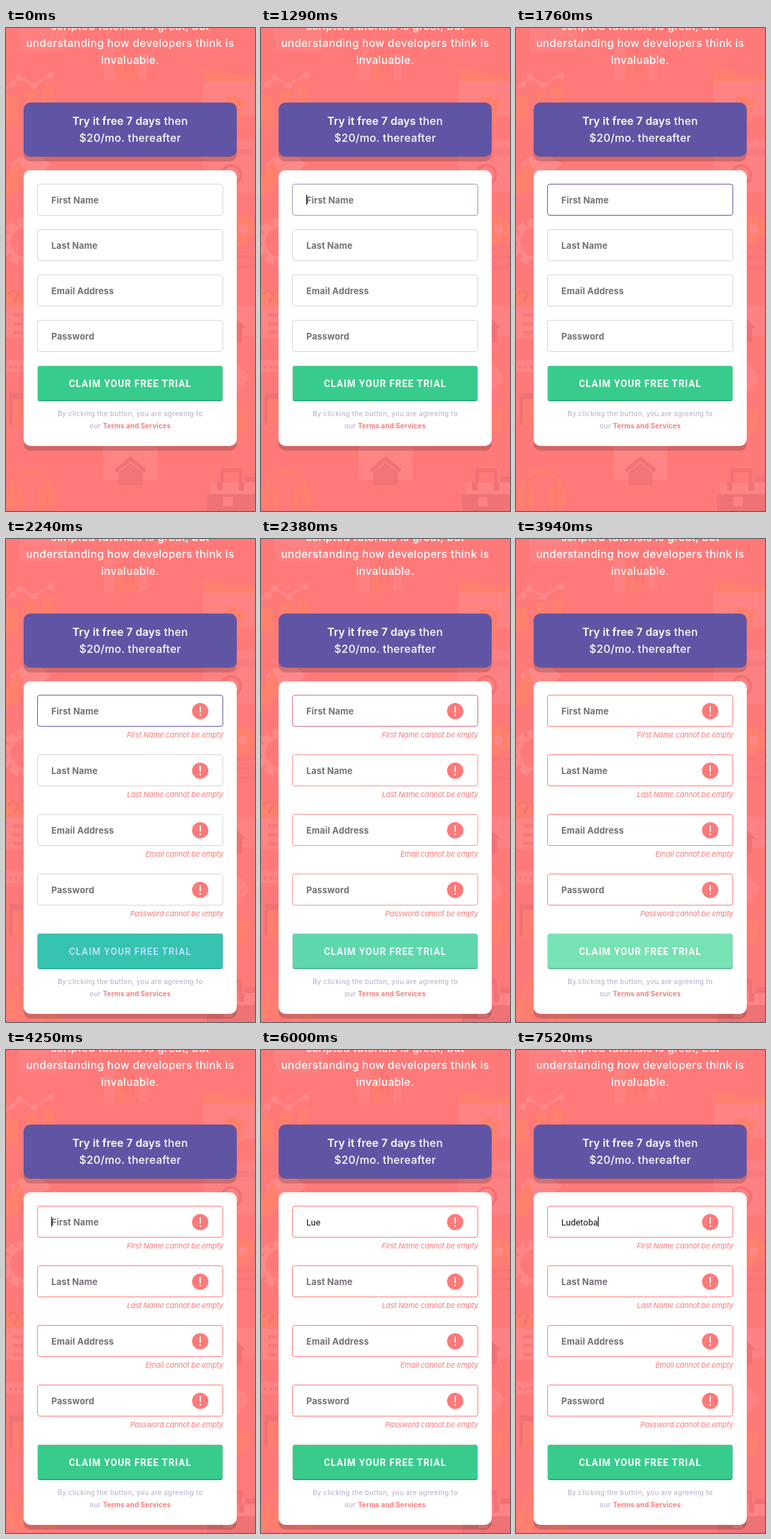
These frames come from a looping animation (368x713 px, 8 s). An HTML page:

```html
<!DOCTYPE html>
<html lang="en">
<head>
<meta charset="utf-8">
<title>Sign-up form</title>
<style>
* { box-sizing: border-box; margin: 0; }
html, body { width: 100%; height: 100%; overflow: hidden; }
body { position: relative; background: #ff7979; font: 500 16px/25px Inter, "Open Sans", sans-serif; letter-spacing: .32px; }
body > * { position: absolute; }
#art { left: 0; top: 0; }
.pink { fill: #ff8888; } .orange { fill: #ff806d; } .dusk { fill: #ef7275; }
.ring { fill: none; stroke: #ff8888; }
.ring.orange { stroke: #ff806d; } .ring.dusk { stroke: #ef7275; }
.intro { left: 0; top: -15px; width: 367px; text-align: center; color: #fff; }
.offer, .card { left: 26px; width: 315px; border-radius: 10px; box-shadow: 0 7px rgba(0, 0, 0, .17); }
.offer { top: 110px; height: 80px; padding-top: 15px; background: #6055a5; color: #fff; text-align: center; }
.offer b { font-weight: 600; letter-spacing: .1px; }
.card { top: 210px; padding: 20px 20px 21px; background: #fff; }
.row { margin-bottom: 20px; }
.field { position: relative; height: 47px; padding-left: 20px; border: 1px solid; border-radius: 4px; line-height: 45px; white-space: pre; }
.hint { font-size: 13px; font-weight: 700; letter-spacing: .15px; color: #757077; }
#typed { font: 13px/45px Roboto, sans-serif; letter-spacing: 0; color: #111; }
#caret { position: absolute; top: 15px; width: 1px; height: 15px; background: #000; }
.icon { position: absolute; left: 228px; top: 11px; }
.msg { height: 21px; font-size: 11px; font-weight: 400; font-style: italic; letter-spacing: -.22px; text-align: right; color: #ff7979; }
.icon, .msg { display: none; }
.bad .icon, .bad .msg { display: block; }
#button { position: relative; height: 53px; border: 1px solid #dedede; border-bottom: 0; border-radius: 4px; box-shadow: inset 0 -2px rgba(0, 0, 0, .16); color: #fff; font: bold 14px/52px Roboto, sans-serif; letter-spacing: 1px; text-align: center; }
#tap { position: absolute; inset: -1px -1px 0; border-radius: 4px; background: rgba(51, 181, 229, .4); }
.terms { margin-top: 9px; font-size: 10px; line-height: 18px; letter-spacing: .31px; text-align: center; color: #bab7d4; }
.terms b { font-weight: 700; letter-spacing: .2px; color: #ff7979; }
</style>
</head>
<body>
<svg id="art" width="368" height="713">
  <!-- charts and hand -->
  <path class="pink" d="M20 0h70v34h-70z" opacity=".5"/>
  <path class="ring" stroke-width="3" d="M0 90L10 83L20 72L40 85L66 69"/>
  <g class="pink"><circle cx="10" cy="83" r="5"/><circle cx="20" cy="73" r="5"/><circle cx="41" cy="85" r="5"/><circle cx="66" cy="70" r="5"/></g>
  <path class="orange" d="M0 101h18v36h-18zM28 94h17v20h-17zM54 88h15v25h-15zM0 140h26v3h-26z"/>
  <path class="pink" d="M145 30h16v48h-16zM196 38h12v38h-12zM222 22l4 4l-14 12z" opacity=".5"/>
  <path class="orange" d="M160 38h34v34q-17 14-34 0z" opacity=".5"/>
  <path class="dusk" d="M174 25h8v40h-8zM184 34h7v32h-7z" opacity=".3"/>
  <!-- folder, gear and camera -->
  <path class="pink" d="M292 78h76v52h-76z" opacity=".7"/>
  <path class="orange" d="M292 63h28l6 6h42v10h-76zM328 100h14v7l9-4l5 9l-7 5v18l-8 10h-20v-34z"/>
  <path class="pink" d="M292 164h76v79h-76z" opacity=".6"/>
  <path class="dusk" d="M325 178h43v10h-43z" opacity=".4"/>
  <circle class="ring dusk" cx="333" cy="217" r="14" stroke-width="4"/>
  <!-- rocket and cog -->
  <path class="pink" d="M20 190h32l16 11l-20 16h-30l-12-15z"/>
  <path class="orange" d="M0 222l18-28l8 18v12l-10 20l-16 3z"/>
  <circle class="ring" cx="28" cy="316" r="29" stroke-width="12" stroke-dasharray="13 5"/>
  <circle class="ring" cx="28" cy="316" r="24" stroke-width="5"/>
  <!-- pin and text lines -->
  <path class="orange" d="M341 280q27-10 27 19q-5 16-27 22z"/>
  <circle class="pink" cx="351" cy="297" r="7"/>
  <path class="dusk" d="M341 323h27v4h-27zM341 336h27v4h-27zM341 351h27v4h-27z" opacity=".5"/>
  <!-- lock and page -->
  <path class="orange" d="M0 386h18l6 8v16h-24z"/>
  <path class="ring dusk" stroke-width="4" d="M4 394q2-8 10-5t-1 12v5" opacity=".7"/>
  <path class="pink" d="M0 411h26v47h-26zM0 490h26v18h-26z" opacity=".75"/>
  <path class="dusk" d="M10 421h15v5h-15zM10 434h15v5h-15zM10 447h15v5h-15zM4 498h5v5h-5zM12 498h5v5h-5zM20 498h5v5h-5z" opacity=".6"/>
  <!-- house, tag and stand -->
  <path class="pink" d="M341 410h27v45h-27zM341 494l21 22l-21 24z" opacity=".65"/>
  <path class="dusk" d="M341 430l14 13h-6v21h-8zM5 539h21v9h-16v31h16v7h-21z"/>
  <path class="orange" d="M10 550h16v40h-16zM341 562h20v24q-8 14-20 14z" opacity=".8"/>
  <!-- upload box, headset and case -->
  <path class="pink" d="M144 610h80v57h-80z" opacity=".75"/>
  <path class="dusk" d="M184 632l24 20l-4 4l-20-16l-20 16l-4-4z" opacity=".9"/>
  <path class="dusk" d="M184 642l18 14v19h-36v-19z" opacity=".8"/>
  <path class="ring orange" stroke-width="6" d="M9 690v-8a28 28 0 0 1 56 0v8"/>
  <path class="orange" d="M1 680h12v28h-12zM17 677h9v33h-9zM49 677h9v33h-9zM62 680h12v28h-12z"/>
  <path class="dusk" d="M297 688h71v25h-71zM317 650h32v20h-5v-14h-22v14h-5zM354 662h14v8h-14z"/>
  <path class="pink" d="M302 671h66v17h-66zM321 692h14v14h-14z" opacity=".8"/>
  <path class="dusk" d="M312 671h8v12h-8zM344 671h8v12h-8z"/>
</svg>
<p class="intro">scripted tutorials is great, but<br>understanding how developers think is<br>invaluable.</p>
<div class="offer"><b>Try it free 7 days</b> then<br>$20/mo. thereafter</div>
<div class="card" id="card">
  <div id="rows"></div>
  <div id="button">CLAIM YOUR FREE TRIAL<div id="tap"></div></div>
  <p class="terms">By clicking the button, you are agreeing to<br>our <b>Terms and Services</b></p>
</div>
<script>
const LOOP = 8000, FADE = 340, SUBMIT = 2240;
const GREY = [214, 214, 214], PURPLE = [96, 85, 165], RED = [255, 121, 121];
const GREEN = [56, 204, 140], MINT = [119, 226, 179];
const NAME = 'Ludetoba';
// [time, text in the first field]
const typing = [[0, ''], [5070, 'L'], [5250, 'Lu'], [5520, 'Lue'], [6450, 'Lu'],
  ...[6690, 7040, 7220, 7320, 7420, 7520].map((t, i) => [t, NAME.slice(0, i + 3)])];
const caretOn = [[1280, 1760], [4000, 4480], [4960, 6000], [6500, LOOP]];

const $ = id => document.getElementById(id);
$('rows').innerHTML = ['First Name', 'Last Name', 'Email Address', 'Password'].map((label, i) => `
  <div class="row"><div class="field">${i ? '' : '<span id="typed"></span>'}<span class="hint">${label}</span>${i ? '' : '<i id="caret"></i>'}
  <svg class="icon" width="24" height="24"><circle cx="12" cy="12" r="12" fill="#ff7979"/><path d="M11 5h2v9h-2zM11 16.5h2v2.5h-2z" fill="#fff"/></svg></div>
  <div class="msg">${label.replace(' Address', '')} cannot be empty</div></div>`).join('');
const fields = document.querySelectorAll('.field');
const hint = document.querySelector('.hint');

const clamp = x => Math.max(0, Math.min(1, x));
// CSS "ease": cubic-bezier(.25, .1, .25, 1)
function ease(x) {
  const curve = (a, b, s) => 3 * a * s * (1 - s) ** 2 + 3 * b * s * s * (1 - s) + s ** 3;
  let lo = 0, hi = 1;
  for (let i = 0; i < 20; i++) {
    const mid = (lo + hi) / 2;
    if (curve(.25, .25, mid) < x) lo = mid; else hi = mid;
  }
  return curve(.1, 1, hi);
}
const fade = (t, start) => t <= start ? 0 : t >= start + FADE ? 1 : ease((t - start) / FADE);
const mix = (a, b, k) => a.map((v, i) => v + (b[i] - v) * k);
const rgb = c => `rgb(${c.map(Math.round)})`;

function draw(t) {
  const bad = fade(t, SUBMIT);
  $('card').classList.toggle('bad', t >= SUBMIT);
  fields.forEach((field, i) => {
    const base = i ? GREY : mix(GREY, PURPLE, fade(t, 1190));
    field.style.borderColor = rgb(mix(base, RED, bad));
  });
  $('button').style.backgroundColor = rgb(mix(GREEN, MINT, bad - fade(t, 3940)));
  $('tap').style.opacity = t < SUBMIT ? 0 : clamp((SUBMIT + 160 - t) / 80);

  const text = typing.filter(step => step[0] <= t).pop()[1];
  $('typed').textContent = text;
  hint.hidden = text !== '';
  $('caret').hidden = !caretOn.some(([from, to]) => t >= from && t < to);
  $('caret').style.left = 20 + Math.floor($('typed').getBoundingClientRect().width) + 'px';
}

const start = performance.now();
function tick() {
  draw((performance.now() - start) % LOOP);
  requestAnimationFrame(tick);
}
tick();
</script>
</body>
</html>
```
